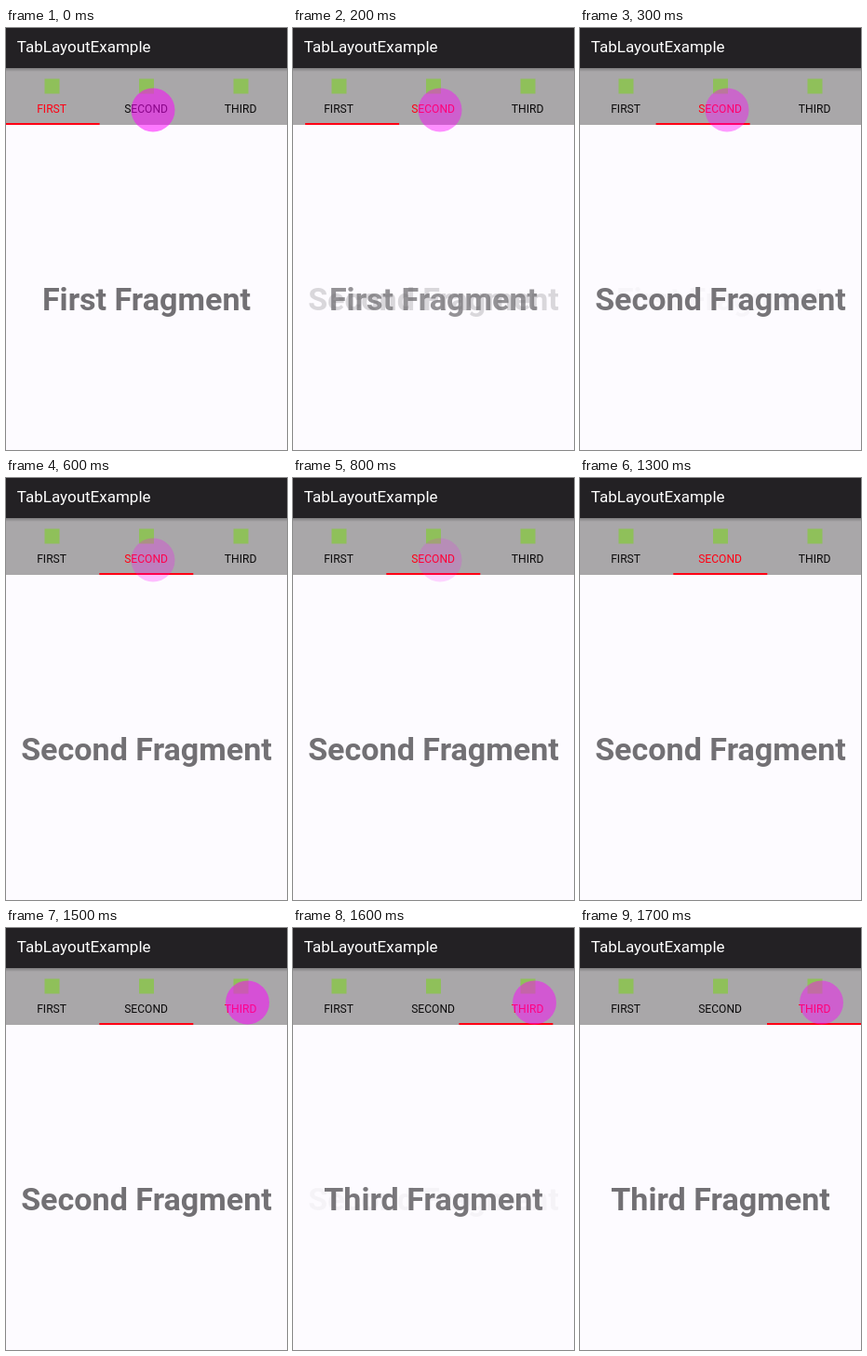
These frames come from a looping animation (302x453 px, 1.8 s). An HTML page:

```html
<!DOCTYPE html>
<html lang="en">
<head>
<meta charset="utf-8">
<title>Tab layout</title>
<style>
  html, body { margin: 0; width: 100%; height: 100%; overflow: hidden; background: #fdfbff; }
  svg { display: block; width: 302px; height: 453px; font-family: Roboto, sans-serif; }
  .label { font-size: 12.1px; text-anchor: middle; }
  .page { font-size: 34.1px; font-weight: 700; text-anchor: middle; fill: #727074; }
</style>
</head>
<body>
<svg viewBox="0 0 302 453">
  <defs>
    <linearGradient id="shade" x2="0" y2="1">
      <stop stop-color="#000" stop-opacity=".25"/>
      <stop offset="1" stop-color="#000" stop-opacity="0"/>
    </linearGradient>
  </defs>
  <rect width="302" height="453" fill="#fdfbff"/>
  <rect y="43" width="302" height="61" fill="#a9a7a9"/>
  <rect y="43" width="302" height="4" fill="url(#shade)"/>
  <rect width="302" height="43" fill="#232124"/>
  <text x="11.8" y="26" font-size="17" fill="#fff">TabLayoutExample</text>
  <g id="tabs"></g>
  <rect id="indicator" y="102" width="101" height="2" fill="#ff0014"/>
  <circle id="touch" r="23.5" fill="#f0f"/>
</svg>
<script>
const LOOP = 1800, STEP = 100, TAB_PITCH = 100.7;
const TOUCH_ALPHA = 0.52, TOUCH_FADE = 1150;
const names = ['First', 'Second', 'Third'];
const taps = [
  { at: 0, x: 158, y: 88, select: 100, slide: 140, duration: 300 },
  { at: 1500, x: 259.5, y: 80, select: 1500, slide: 1500, duration: 200 }
];
const byId = id => document.getElementById(id);
const clamp = v => Math.min(1, Math.max(0, v));

function add(tag, attributes, text = '') {
  const node = document.createElementNS('http://www.w3.org/2000/svg', tag);
  for (const key in attributes) node.setAttribute(key, attributes[key]);
  node.textContent = text;
  return byId('tabs').appendChild(node);
}

const tabs = names.map((name, i) => {
  const x = 49.5 + i * 101.5;
  add('rect', { x: x - 8, y: 54.5, width: 16, height: 16, fill: '#8fc05a' });
  return {
    label: add('text', { x: x - 0.4, y: 91.4, class: 'label' }, name.toUpperCase()),
    page: add('text', { x: 151, y: 303, class: 'page' }, name + ' Fragment')
  };
});

// cubic-bezier(.4, 0, .2, 1), solved for x by bisection
function ease(x) {
  if (x <= 0 || x >= 1) return clamp(x);
  let low = 0, high = 1, s;
  for (let i = 0; i < 20; i++) {
    s = (low + high) / 2;
    const bx = 1.2 * s * (1 - s) ** 2 + 0.6 * s * s * (1 - s) + s ** 3;
    if (bx < x) low = s; else high = s;
  }
  return 3 * s * s - 2 * s ** 3;
}

function draw(now) {
  const t = Math.floor(now % LOOP / STEP) * STEP;
  const position = taps.reduce((sum, tap) => sum + ease((t - tap.slide) / tap.duration), 0);
  const selected = taps.filter(tap => t >= tap.select).length;
  const tap = taps[t < taps[1].at ? 0 : 1];

  tabs.forEach(({ label, page }, i) => {
    label.setAttribute('fill', i === selected ? '#ff0014' : '#0c0b0c');
    const leaving = (1 - clamp(position - i)) ** 2;
    const entering = 1 - (1 - clamp(position - i + 1)) ** 2;
    page.setAttribute('opacity', position >= i ? leaving : entering);
  });
  byId('indicator').setAttribute('x', position * TAB_PITCH - 0.4);

  const touch = byId('touch');
  touch.setAttribute('cx', tap.x);
  touch.setAttribute('cy', tap.y);
  touch.setAttribute('opacity', TOUCH_ALPHA * clamp(1 - (t - tap.at) / TOUCH_FADE));
}

const start = performance.now();
function frame() {
  draw(performance.now() - start);
  requestAnimationFrame(frame);
}
frame();
</script>
</body>
</html>
```
